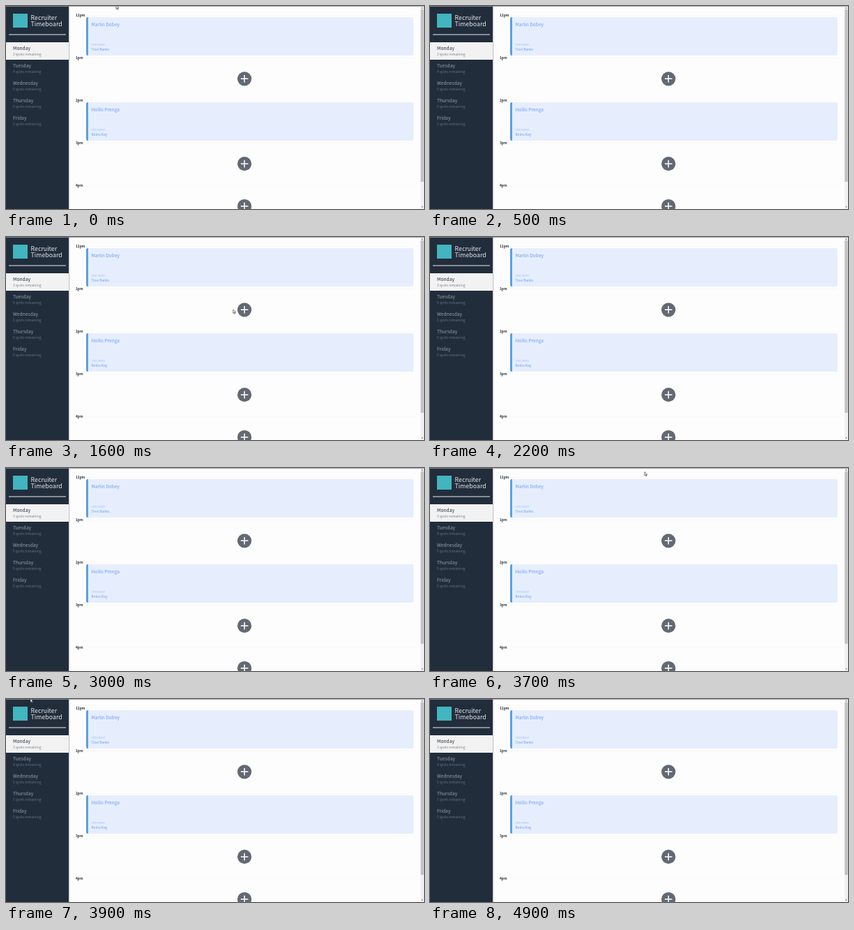
An HTML page that plays this animation: 600x291 px, repeating every 5 s.

```html
<!DOCTYPE html>
<html lang="en">
<head>
<meta charset="utf-8">
<title>Day planner</title>
<style>
html, body { margin: 0; width: 100%; height: 100%; overflow: hidden; background: #fdfdfd; }
svg { display: block; width: 600px; height: 291px; font-family: "Noto Sans CJK JP", "Noto Sans CJK SC", "Open Sans", sans-serif; }
.card rect { fill: #e6eefe; }
.card .bar { fill: #59a0e0; }
.card text { fill: #699bf7; }
.card .label { fill: #a3c0f8; }
.card .tools { visibility: hidden; }
.hover rect, .hover .bar { fill: #4b96e0; }
.hover text, .hover .label { fill: #fff; }
.hover .tools { visibility: visible; }
</style>
</head>
<body>
<svg id="stage" viewBox="0 0 600 291"></svg>
<script>
const stage = document.getElementById('stage');

const text = (x, y, size, str, attrs = '') =>
  `<text x="${x}" y="${y}" font-size="${size}" ${attrs}>${str}</text>`;

const rect = (x, y, w, h, fill, attrs = '') =>
  `<rect x="${x}" y="${y}" width="${w}" height="${h}" fill="${fill}" ${attrs}/>`;

const tools = `<g class="tools" fill="none" stroke="#fff" stroke-width=".9" stroke-linejoin="round">
  <path d="M449 42.5h-4.5v6.5h6.5v-3M447.5 46.5l.4-1.8 4-4 1.4 1.4-4 4z"/>
  <path d="M455.5 42.5h7M457.5 42.3v-1.3h3v1.3M456.3 42.8l.4 6.2h4.6l.4-6.2M458.2 44.3v3M459.8 44.3v3"/>
</g>`;

const card = (y, name, host) => `<g class="card" transform="translate(115 ${y})">
  <rect width="470" height="55" rx="2.5"/>
  <path class="bar" d="M3 0H2.5A2.5 2.5 0 0 0 0 2.5v50A2.5 2.5 0 0 0 2.5 55H3z"/>
  ${text(7.5, 13.2, 6.6, name)}
  ${text(7.5, 40.8, 3.7, 'Interviewer', 'class="label"')}
  ${text(7.5, 47.8, 4.9, host)}
  ${tools}</g>`;

const plus = y => `<circle cx="342.3" cy="${y}" r="10.1" fill="#626973"/>
  <path d="M337 ${y}h10.6M342.3 ${y - 5.3}v10.6" stroke="#fff" stroke-width="1.5"/>`;

const hour = (label, i) => {
  const y = 13.3 + i * 60.9;
  return rect(115, y, 470, .6, '#f6f6f6') +
    text(100, y + 1.8, 4.8, label, 'font-weight="700" fill="#222b36"');
};

const day = (name, spots, i) => {
  const y = 52 + i * 25;
  return (i ? '' : rect(0, y, 90, 25, '#f2f2f2')) +
    text(10, y + 11.2, 6.7, name, `fill="${i ? '#97a0aa' : '#222f3e'}"`) +
    text(10, y + 18.8, 4.9, spots + ' spots remaining', `fill="${i ? '#667281' : '#7c8288'}"`);
};

const days = [['Monday', 3], ['Tuesday', 4], ['Wednesday', 5], ['Thursday', 5], ['Friday', 5]];

stage.innerHTML = `
  <defs><linearGradient id="shade">
    <stop stop-color="#bbb"/><stop offset="1" stop-color="#fdfdfd"/>
  </linearGradient></defs>
  ${rect(0, 0, 600, 291, '#fdfdfd')}
  ${rect(90, 0, 2, 291, 'url(#shade)')}
  ${['12pm', '1pm', '2pm', '3pm', '4pm'].map(hour).join('')}
  ${card(16, 'Marlin Dobey', 'Tove Banks')}
  ${card(138, 'Hollis Prenga', 'Belira Kay')}
  ${[104.3, 226.2, 287].map(plus).join('')}
  ${rect(595, 0, 5, 291, '#f1f1f1')}
  ${rect(595.4, 5, 4.2, 247, '#c1c1c1')}
  <path d="M596.2 3.4l1.3-1.5 1.3 1.5zM596.2 287.6l1.3 1.5 1.3-1.5z" fill="#555"/>
  ${rect(0, 0, 90, 291, '#222d3c')}
  ${rect(10, 11, 21, 20, '#42b5bf')}
  ${['Recruiter', 'Timeboard'].map((s, i) =>
    text(35.6, 20 + i * 9, 8.8, s, 'font-weight="300" fill="#e4e7ea"')).join('')}
  ${rect(4, 40.5, 82, 1, '#eceef0')}
  ${days.map(([name, spots], i) => day(name, spots, i)).join('')}
  ${rect(0, 0, 600, .8, '#8f9296')}
  <path id="cursor" d="M0 0v5.3l1.3-1.1 .9 2 .9-.4-.9-1.9h1.8z" fill="#fff" stroke="#222" stroke-width=".6"/>`;

const cursor = document.getElementById('cursor');
const topCard = stage.querySelector('.card');

// Pointer samples: start time, then position; no position means hidden.
const track = [
  [0, 158, -1], [100], [1000, 164, 0], [1100, 183.5, 43.5], [1200, 247, 88],
  [1300, 326, 104], [2000], [3700, 308, 5.5], [3800, 62.5, 9], [3900, 35, -.5], [4000]
];

function draw(now) {
  const t = now % 5000;
  const [start, x, y] = track.findLast(p => p[0] <= t);
  cursor.setAttribute('visibility', x === undefined ? 'hidden' : 'visible');
  if (x !== undefined) cursor.setAttribute('transform', `translate(${x} ${y})`);
  topCard.classList.toggle('hover', start === 3800);
  requestAnimationFrame(draw);
}
draw(0);
</script>
</body>
</html>
```
